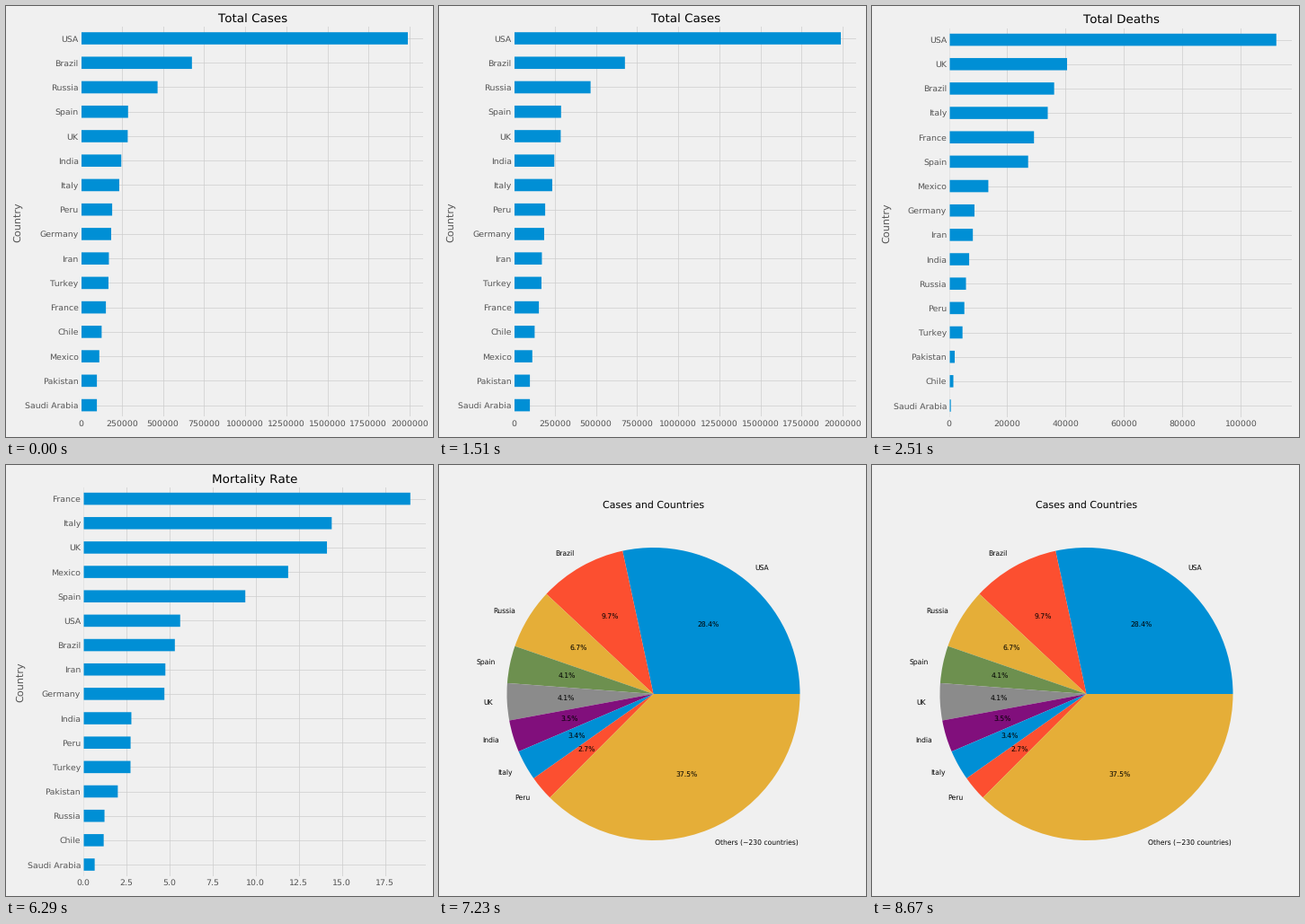
Write a matplotlib script that moves like this. It is 475 by 480 pixels and loops after 9630 ms.

```python
import matplotlib.pyplot as plt
from matplotlib.animation import FuncAnimation
from matplotlib.ticker import MultipleLocator

plt.style.use("fivethirtyeight")
GREY = "#555555"
plt.rcParams.update({
    "font.family": "DejaVu Sans", "text.hinting": "none",
    "text.kerning_factor": 6,
    "xtick.color": GREY, "ytick.color": GREY, "axes.labelcolor": GREY,
    "grid.color": "#cbcbcb", "grid.linestyle": "-", "grid.linewidth": 1,
})

W, H, DPI = 475, 480, 48
INTERVAL, LOOP = 30, 9630
CHANGES = (2510, 4870, 7230)

# country: (cases, deaths)
DATA = {
    "USA": (1988544, 112096), "Brazil": (676494, 36044),
    "Russia": (467673, 5859), "Spain": (288390, 27135),
    "UK": (286194, 40465), "India": (247195, 6946),
    "Italy": (234801, 33846), "Peru": (191758, 5301),
    "Germany": (185696, 8769), "Iran": (171789, 8209),
    "Turkey": (169218, 4669), "France": (153634, 29142),
    "Chile": (127745, 1541), "Mexico": (113619, 13511),
    "Pakistan": (98943, 2002), "Saudi Arabia": (98869, 676),
}
WORLD_CASES = 7007900

fig = plt.figure(figsize=(W / DPI, H / DPI), dpi=DPI)


def add_axes(left, top, right, bottom):
    """Axes placed by pixel edges, measured from the top left."""
    return fig.add_axes([left / W, 1 - bottom / H,
                         (right - left) / W, (bottom - top) / H])


def bar_panel(title, values, step, box):
    ax = add_axes(*box)
    ranked = sorted(values.items(), key=lambda item: item[1])
    names, sizes = zip(*ranked)
    ax.barh(range(len(names)), sizes, height=0.5, color="C0", snap=False)
    ax.spines["left"].set_snap(False)
    ax.set_yticks(range(len(names)), names)
    ax.set_ylim(-0.5, len(names) - 0.5)
    ax.set_xlim(0, 1.05 * sizes[-1])
    ax.xaxis.set_major_locator(MultipleLocator(step))
    ax.ticklabel_format(axis="x", style="plain", useOffset=False)
    ax.set_title(title)
    ax.set_ylabel("Country")
    return ax


def pie_panel():
    cx, cy, half = 238.5, 255, 203.75
    ax = add_axes(cx - half, cy - half, cx + half, cy + half)
    cases = {name: DATA[name][0] for name in list(DATA)[:8]}
    cases["Others (~230 countries)"] = WORLD_CASES - sum(cases.values())
    ax.pie(cases.values(), labels=cases.keys(), autopct="%1.1f%%",
           colors=[f"C{i % 6}" for i in range(len(cases))],
           textprops={"fontsize": 11.46, "color": "black"})
    ax.set_title("Cases and Countries", fontsize=16.5, pad=4.9)
    return ax


panels = [
    bar_panel("Total Cases", {c: v[0] for c, v in DATA.items()},
              250000, (83, 22.4, 465.2, 458.2)),
    bar_panel("Total Deaths", {c: v[1] for c, v in DATA.items()},
              20000, (85.5, 24, 468, 458.6)),
    bar_panel("Mortality Rate", {c: 100 * v[1] / v[0] for c, v in DATA.items()},
              2.5, (85.5, 24, 468, 458.6)),
    pie_panel(),
]


def update(frame):
    current = sum(frame >= change // INTERVAL for change in CHANGES)
    for i, ax in enumerate(panels):
        ax.set_visible(i == current)
    return panels


anim = FuncAnimation(fig, update, frames=LOOP // INTERVAL,
                     init_func=lambda: update(0),
                     interval=INTERVAL, repeat=True, repeat_delay=0)
plt.show()
```
